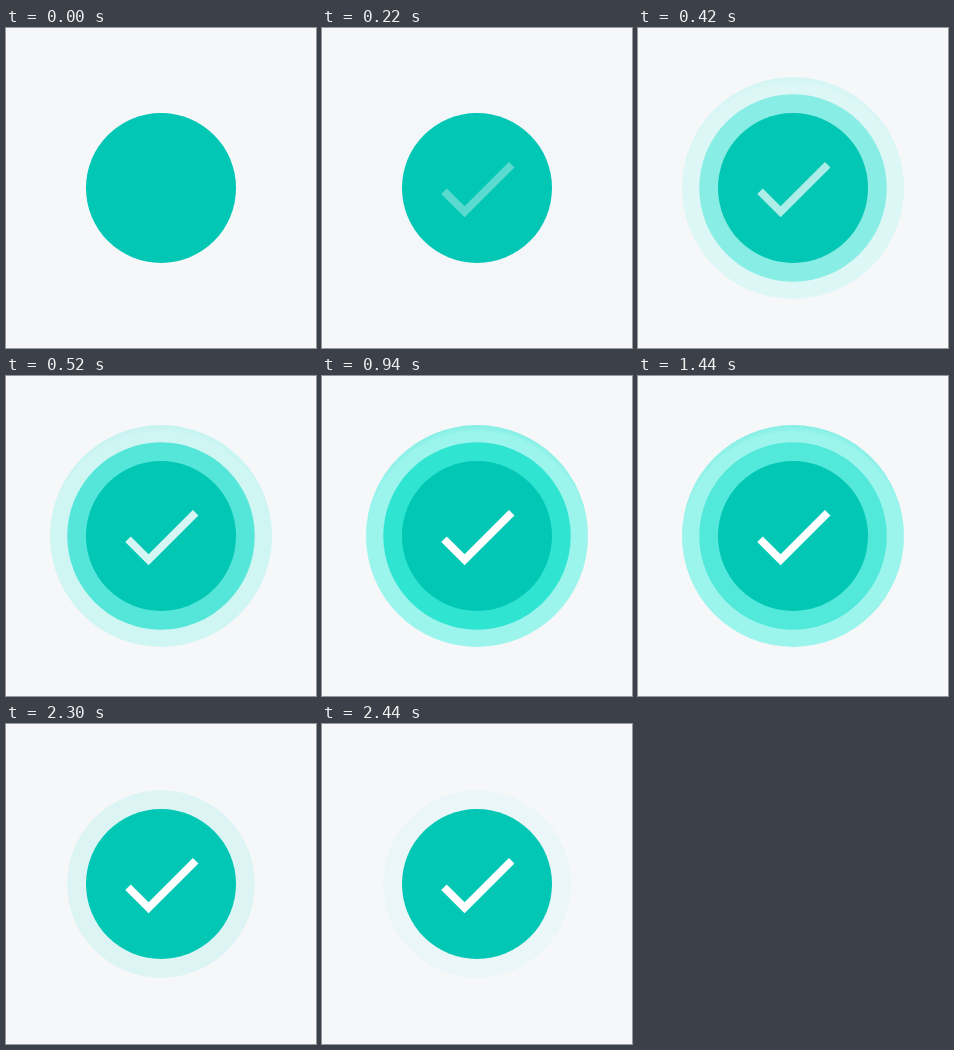
An HTML page with a canvas for the animation above (2540 ms loop, 310 by 320 pixels).

```html
<!DOCTYPE html>
<html lang="en">
<head>
<meta charset="utf-8">
<title>Success</title>
<style>
  html, body { margin: 0; width: 100%; height: 100%; overflow: hidden; background: #f5f7f9; }
  canvas { display: block; }
</style>
</head>
<body>
<canvas id="stage" width="310" height="320"></canvas>
<script>
const ctx = document.getElementById('stage').getContext('2d');
const W = 310, H = 320, CX = W / 2, CY = H / 2;
const LOOP = 2540, STEP = 20;

const ramp = (t, from, to) => Math.min(1, Math.max(0, (t - from) / (to - from)));
const smooth = x => x * x * (3 - 2 * x);

function disc(radius, fill, alpha) {
  ctx.globalAlpha = alpha;
  ctx.fillStyle = fill;
  ctx.beginPath();
  ctx.arc(CX, CY, radius, 0, Math.PI * 2);
  ctx.fill();
}

// Soft inner shade along the top edge of a disc
function topShade(radius, depth) {
  const y = CY + depth;
  const shade = ctx.createRadialGradient(CX, y, radius, CX, y, radius + depth);
  shade.addColorStop(0, 'rgba(0,200,181,0)');
  shade.addColorStop(1, 'rgba(0,200,181,0.4)');
  return shade;
}

function tick(alpha) {
  const x = 142.6, y = 183.8, short = 20.6, long = 47.1;
  ctx.globalAlpha = alpha;
  ctx.strokeStyle = '#fff';
  ctx.lineWidth = 7.8;
  ctx.beginPath();
  ctx.moveTo(x - short, y - short);
  ctx.lineTo(x, y);
  ctx.lineTo(x + long, y - long);
  ctx.stroke();
}

const halo = topShade(111, 8);

function draw(t) {
  const outer = 0.37 * ramp(t, 225, 940) * (1 - ramp(t, 1440, 1660));
  const inner = 0.685 * smooth(ramp(t, 190, 615)) * (1 - ramp(t, 940, LOOP));

  ctx.globalAlpha = 1;
  ctx.fillStyle = '#f5f7f9';
  ctx.fillRect(0, 0, W, H);
  disc(111, 'rgb(0,241,214)', outer);
  disc(111, halo, outer);
  disc(93.75, 'rgb(0,220,198)', inner);
  disc(75, 'rgb(1,199,180)', 1);
  tick(ramp(t, 0, 620));
}

const start = performance.now();
function frame() {
  const t = (performance.now() - start) % LOOP;
  draw(Math.floor(t / STEP) * STEP);
  requestAnimationFrame(frame);
}
frame();
</script>
</body>
</html>
```
